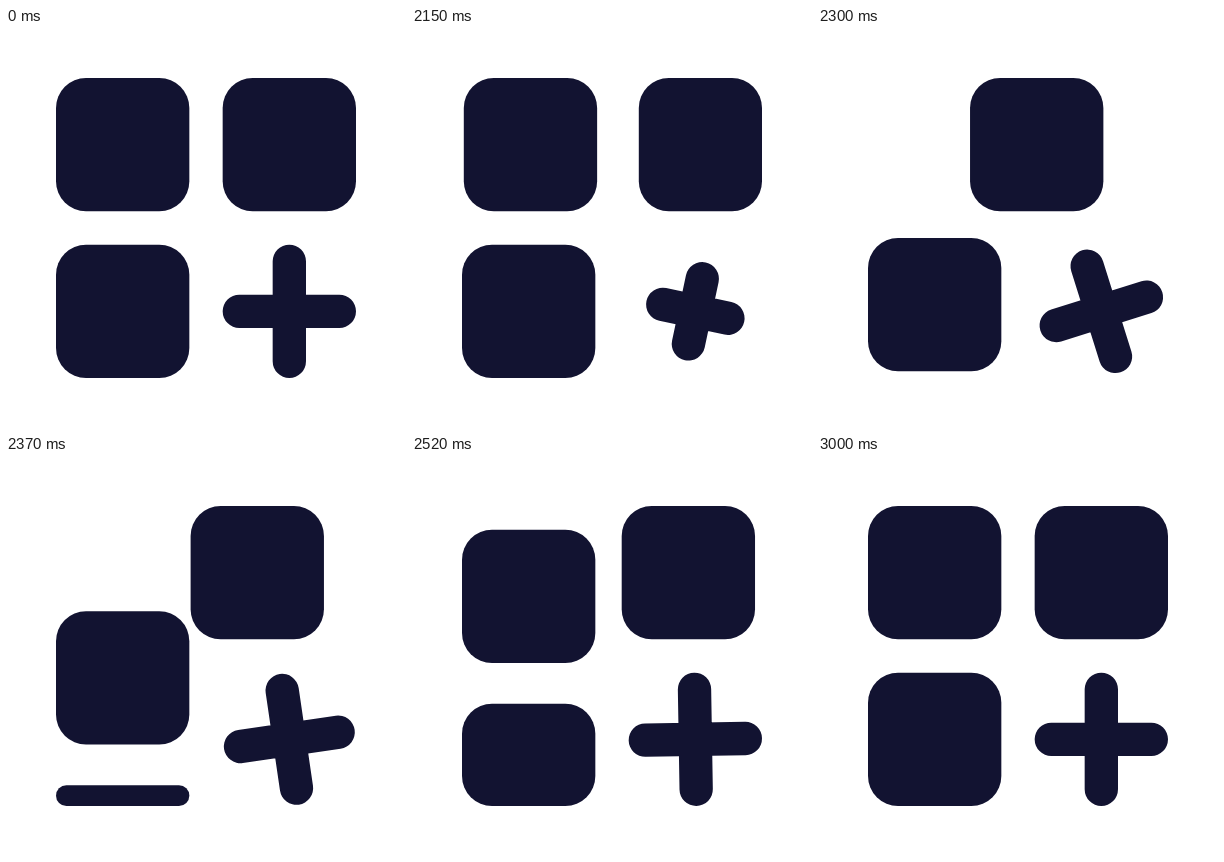
Animation, 400 px wide and 400 px high, one loop 3.02 s. Source, as an HTML page:

```html
<!DOCTYPE html>
<html lang="en">
<head>
<meta charset="utf-8">
<title>Grid add</title>
<style>
  html, body { margin: 0; width: 100%; height: 100%; overflow: hidden; background: #fff; }
  svg { display: block; width: 100%; height: 100%; }
</style>
</head>
<body>
<svg viewBox="0 0 400 400" fill="#121331">
  <rect id="leaving"/>
  <rect id="across"/>
  <rect id="up"/>
  <rect id="growing"/>
  <path id="plus" fill="none" stroke="#121331" stroke-width="33.33" stroke-linecap="round"/>
</svg>
<script>
const LOOP = 3020, REST = 2000, STEP = 25;
const NEAR = 50, SIZE = 400 / 3, SHIFT = 500 / 3, FAR = NEAR + SHIFT, END = 350;
const CENTER = FAR + SIZE / 2, RADIUS = 30;
const el = id => document.getElementById(id);
const parts = Object.fromEntries(
  ['leaving', 'across', 'up', 'growing', 'plus'].map(id => [id, el(id)]));

// Cubic Bezier easing with control points (x1, 0) and (x2, 1)
function bezier(x, x1, x2) {
  if (x <= 0) return 0;
  if (x >= 1) return 1;
  let low = 0, high = 1, u = 0.5;
  for (let i = 0; i < 30; i++) {
    const v = 1 - u;
    if (3 * u * v * v * x1 + 3 * u * u * v * x2 + u * u * u < x) low = u;
    else high = u;
    u = (low + high) / 2;
  }
  return u * u * (3 - 2 * u);
}

const ease = (t, start, length, x1 = 0.4, x2 = 0) => bezier((t - start) / length, x1, x2);
const mix = (a, b, p) => a + (b - a) * p;

function setRect(rect, x, y, width, height) {
  const rx = Math.min(RADIUS, width / 2, height / 2);
  const values = { x, y, width, height, rx };
  for (const name in values) rect.setAttribute(name, values[name]);
  rect.style.display = Math.min(width, height) < 0.5 ? 'none' : '';
}

function draw(ms) {
  // The picture advances in 25 ms steps, shown on a 10 ms clock
  const t = STEP * Math.floor((Math.floor(ms / 10) * 10 + 5) / STEP) - REST;

  const left = mix(FAR, END, ease(t, 51, 249, 1, 0.6));
  setRect(parts.leaving, left, NEAR, END - left, SIZE);
  setRect(parts.across, mix(NEAR, FAR, ease(t, 111, 600)), NEAR, SIZE, SIZE);
  setRect(parts.up, NEAR, mix(FAR, NEAR, ease(t, 233, 590)), SIZE, SIZE);
  const height = SIZE * ease(t, 287, 620, 0.3);
  setRect(parts.growing, NEAR, END - height, SIZE, height);

  const shrink = ease(t, 0, 145) - ease(t, 145, 330);
  const arm = mix(50, 33.3, shrink);
  const angle = 90 * ease(t, 50, 570);
  parts.plus.setAttribute('d', `M${-arm} 0H${arm}M0 ${-arm}V${arm}`);
  parts.plus.setAttribute('transform', `translate(${CENTER} ${CENTER}) rotate(${angle})`);
}

const begin = performance.now();
function tick() {
  draw((performance.now() - begin) % LOOP);
  requestAnimationFrame(tick);
}
tick();
</script>
</body>
</html>
```
